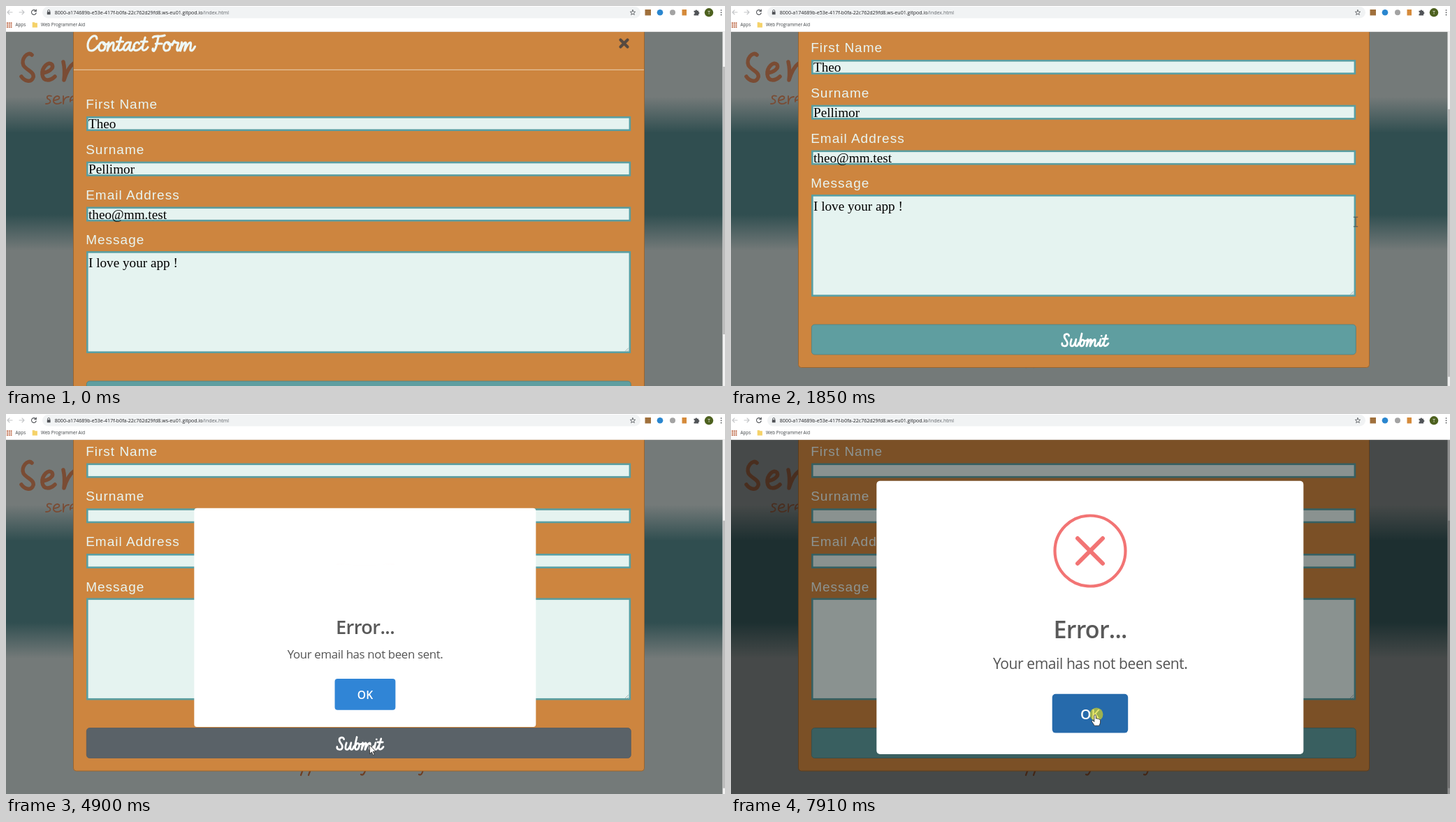
These frames come from a looping animation (1029 px wide and 544 px high, 7.99 s). An HTML page:

```html
<!DOCTYPE html>
<html lang="en">
<head>
<meta charset="utf-8">
<title>Contact form</title>
<style>
  html, body { margin: 0; width: 100%; height: 100%; overflow: hidden; background: #fff; }
  svg { display: block; width: 100%; height: 100%; }
  .ui { font-family: "Open Sans", "Noto Sans", sans-serif; }
  .label { font: 19px "Liberation Sans", Arial, sans-serif; letter-spacing: 1px; fill: #e8f5f2; }
  .value { font: 19.2px "Liberation Serif", "Times New Roman", serif; fill: #000; }
  .field { fill: #e5f3f0; stroke: #5a9ea1; stroke-width: 2.6; }
  .line { fill: none; stroke-linecap: round; stroke-linejoin: round; }
</style>
</head>
<body>
<svg viewBox="0 0 1029 544" preserveAspectRatio="none">
  <defs>
    <linearGradient id="band" gradientUnits="userSpaceOnUse" x1="0" y1="130" x2="0" y2="350">
      <stop offset="0" stop-color="#747a79"/>
      <stop offset=".235" stop-color="#304e50"/>
      <stop offset=".765" stop-color="#304e50"/>
      <stop offset="1" stop-color="#747a79"/>
    </linearGradient>
  </defs>

  <!-- page behind the form -->
  <rect y="37" width="1029" height="507" fill="url(#band)"/>
  <g class="line" stroke="#7a4c34">
    <path stroke-width="5.5" d="M37 70C31 64 21 76 25 85C29 92 41 94 39 102C36 111 26 107 22 101M52 96C60 95 69 90 66 84C61 78 51 88 52 98C53 108 63 108 70 101M82 80C84 88 84 97 83 106C86 96 90 87 97 82"/>
    <path stroke-width="1.8" d="M65 129C60 127 57 130 60 133C65 135 65 140 57 140M68 135C73 135 78 133 76 130C72 127 67 132 68 137C70 141 75 141 79 138M82 129L82 140C82 134 85 130 90 130M92 135C96 135 99 133 98 130C94 127 91 133 92 137"/>
  </g>
  <path class="line" stroke="#6d3f24" stroke-width="2.2" d="M426 506L422 517M437 506L433 517M515 506C514 514 511 518 508 516M597 506C597 514 594 518 591 516"/>

  <!-- form -->
  <g id="form">
    <rect x="96.5" y="0" width="817" height="598.5" rx="4" fill="#cd853f" stroke="#9a652f"/>
    <path d="M97 91.3H913" stroke="#e9d2b5"/>
    <g id="heading" class="line" stroke="#eef7f5" stroke-width="3.1" transform="translate(116 64)"></g>
    <path d="M879.5 48.5l10 10m0-10l-10 10" stroke="#574a40" stroke-width="4.2" stroke-linecap="round"/>
    <g id="fields"></g>
    <path d="M886 494.5l5-5m-2 5l2-2" stroke="#8a9a98" stroke-width=".7"/>
    <rect id="submit" x="115.3" y="537" width="779" height="43" rx="4.5" stroke="#4f7f81" stroke-width=".8"/>
    <g id="submitText" class="line" stroke="#fff" stroke-width="3.3" transform="translate(473 568) scale(.82)"></g>
  </g>
  <rect x="1025.5" y="37" width="4" height="507" fill="#f1f1f1"/>
  <rect id="thumb" x="1026" width="3" height="383" fill="#bdbdbd"/>
  <rect id="dim" y="37" width="1029" height="507"/>

  <!-- alert -->
  <g id="alert" class="ui">
    <rect x="208.3" y="95.8" width="611" height="391.2" rx="5" fill="#fff"/>
    <g class="line" stroke="#f27474">
      <circle id="ring" r="50.5" stroke-width="4.2"/>
      <path id="cross" d="M-18-18L18 18M18-18L-18 18" stroke-width="6"/>
    </g>
    <text x="461.5" y="321" font-size="34" font-weight="600" letter-spacing="-.75" fill="#595959">Error...</text>
    <text x="375" y="365" font-size="21" letter-spacing="-.41" fill="#545454">Your email has not been sent.</text>
    <rect id="ok" x="459.7" y="400.8" width="108.5" height="55.8" rx="5"/>
    <text x="514" y="436.5" font-size="19.5" font-weight="600" text-anchor="middle" fill="#fff">OK</text>
  </g>

  <!-- browser bars -->
  <g class="ui">
    <rect width="1029" height="37" fill="#fff"/>
    <rect x="52" y="1" width="856" height="16.5" rx="8.2" fill="#f1f3f4"/>
    <path d="M0 36.7H1029" stroke="#dcdcdc" stroke-width=".6"/>
    <g class="line" stroke-width="1.1">
      <path stroke="#c4c6c8" d="M9 9H2M5 6L2 9l3 3M19 9h7M23 6l3 3-3 3"/>
      <path stroke="#505357" d="M42.8 7.2A3.4 3.4 0 1 0 43.2 10M43.3 5v2.7h-2.7"/>
      <path stroke="#505357" stroke-width=".9" d="M59.7 8.5V7a1.5 1.5 0 0 1 3 0v1.5"/>
      <path stroke="#505357" stroke-width=".8" d="M897 5.6l1 2.5 2.7.2-2.1 1.7.7 2.6-2.3-1.4-2.3 1.4.7-2.6-2.1-1.7 2.7-.2z"/>
    </g>
    <rect x="58.8" y="8.3" width="4.8" height="4" rx=".5" fill="#505357"/>
    <text x="69.8" y="12" font-size="7.06" fill="#202124">8000-a174689b-e53e-417f-b0fa-22c762d29fd8.ws-eu01.gitpod.io<tspan fill="#5f6368">/index.html</tspan></text>
    <rect x="914.5" y="5" width="8.5" height="8.5" fill="#a0703c"/>
    <circle cx="936" cy="9.3" r="4.3" fill="#2a86cf"/>
    <circle cx="954" cy="9.3" r="4" fill="#a3a3a3"/>
    <rect x="967.5" y="5" width="6.5" height="8.5" fill="#d58a3a"/>
    <path d="M984.5 6.8h2a1.3 1.3 0 1 1 2.6 0h2v2a1.3 1.3 0 1 1 0 2.6v2h-6.6v-2a1.3 1.3 0 0 0 0-2.6z" fill="#505357"/>
    <circle cx="1006" cy="9.3" r="6.2" fill="#4d611f"/>
    <text x="1006" y="11.8" font-size="6.5" text-anchor="middle" fill="#fff">T</text>
    <path class="line" d="M1023.5 6h.1M1023.5 9.3h.1M1023.5 12.6h.1" stroke="#505357" stroke-width="1.7"/>
    <path d="M1 24.5h8M1 27.3h8M1 30.1h8" stroke="#b4552f" stroke-width="1.8" stroke-dasharray="1.8 1"/>
    <path d="M37.7 23.3h3l1 1h3.2v6.4h-7.2z" fill="#f5d269"/>
    <g font-size="6.3" fill="#3c4043">
      <text x="13.5" y="29.2">Apps</text>
      <text x="50" y="29.2">Web Programmer Aid</text>
    </g>
  </g>

  <!-- pointer -->
  <circle id="click" r="9.5" fill="#dcd71e" opacity=".65"/>
  <g id="pointer">
    <path id="arrow" d="M0 0V12.6L2.9 9.9 4.9 14.4 6.8 13.6 4.8 9.2H8.7z" fill="#fff" stroke="#222" stroke-width=".8"/>
    <path id="beam" d="M-3.2-6.8H3.2M0-6.8V6.8M-3.2 6.8H3.2" fill="none" stroke="#4a5554"/>
    <path id="hand" d="M-1.2 8V1C-1.2-.9 1.3-.9 1.3 1V5.3C2.2 4.3 3.6 4.7 3.8 5.7 4.8 4.9 6 5.4 6 6.4 7 5.9 7.8 6.6 7.6 7.6V11L6 15.2H-.8L-4.4 9.6C-5.2 8-3.8 7-2.6 8.2L-1.2 9.6z" fill="#fff" stroke="#222" stroke-width=".8"/>
  </g>
</svg>

<script>
const LOOP = 7990;
const $ = id => document.getElementById(id);
const set = (id, attrs) => { for (const k in attrs) $(id).setAttribute(k, attrs[k]); };
const show = (id, on) => { $(id).style.display = on ? '' : 'none'; };
const clamp = v => Math.min(1, Math.max(0, v));
const mix = (a, b, p) => a + (b - a) * p;

// Brush script letters: advance width, then strokes on a baseline at 0
const brush = {
  C: [15.4, 'M14-17C14-22 9-23 5-18C-1-11 0 0 6 0C10 0 13-3 16-7'],
  o: [12.6, 'M8-12C1-14-1 0 5 0C12 0 12-11 8-12C7-8 11-8 14-10'],
  n: [14.6, 'M3-12L1 0C3-8 9-14 10-11C11-8 7 0 11 0C13 0 15-4 16-6'],
  t: [9, 'M6-19L2-5C1 1 6 1 10-5M0-13H9'],
  a: [14, 'M10-11C5-15 0-6 1-2C3 3 9-5 11-12C9-5 8 0 11 0C13 0 15-4 16-6'],
  c: [11.6, 'M9-10C8-14 1-12 1-4C1 1 7 1 12-5'],
  ' ': [7, ''],
  F: [15, 'M1-19C5-23 11-19 18-22M9-20C7-12 6-3 3 0C1 1 0-1 1-3M5-10H14'],
  r: [11.7, 'M1-8L4-14C5-10 9-12 10-11C8-6 7 0 9 0C11 0 12-3 13-5'],
  m: [21.5, 'M3-12L1 0C3-8 8-14 9-11C9-8 7-3 7 0C10-8 15-14 16-11C17-8 13 0 17 0C19 0 21-4 22-6'],
  S: [14.5, 'M13-18C13-23 4-22 5-16C6-11 12-9 10-3C8 2 0 0 1-5'],
  u: [15, 'M3-12C0-3 1 0 4 0C7 0 10-7 11-12C9-4 9 0 12 0C14 0 15-4 16-6'],
  b: [13.3, 'M6-22C4-12 0-2 5 0C10 0 12-10 8-11C6-12 4-8 3-6M10-9L14-10'],
  i: [7.5, 'M4-12C2-5 1 0 4 0C6 0 8-4 9-6M5.5-18h.1'],
};
function letter(id, text) {
  let x = 0;
  $(id).setAttribute('aria-label', text);
  for (const ch of text) {
    const [advance, d] = brush[ch];
    $(id).innerHTML += `<path d="${d}" transform="translate(${x} 0)"/>`;
    x += advance;
  }
}
letter('heading', 'Contact Form');
letter('submitText', 'Submit');

const fields = [
  ['First Name', 'Theo', 158, 21],
  ['Surname', 'Pellimor', 222.7, 21],
  ['Email Address', 'theo@mm.test', 287.5, 21],
  ['Message', 'I love your app !', 351, 146],
];
$('fields').innerHTML = fields.map(([name, value, y, h]) => `
  <text class="label" x="114.2" y="${h > 21 ? y - 10 : y - 11}">${name}</text>
  <rect class="field" x="116.3" y="${y + 1.3}" width="776.6" height="${h - 2.6}"/>
  <text class="value" x="118" y="${h > 21 ? y + 23 : y + 17}">${value}</text>`).join('');
const values = document.querySelectorAll('.value');

// Progress 0..1 in n held steps, the first at start, the last at end
const steps = (t, start, end, n) =>
  t < start ? 0 : Math.min(n, 1 + Math.floor((t - start) / (end - start) * (n - 1) + 1e-6)) / n;

// start, end, steps, destination
const moves = [
  [70, 530, 8, 879, 302],
  [750, 1060, 5, 894, 306],
  [1540, 1850, 5, 894, 309],
  [2090, 2850, 11, 547, 469],
  [2930, 3170, 4, 521, 476],
  [4800, 4801, 1, 520.5, 474],
  [6280, 6670, 6, 521, 431],
];
function pointerAt(t) {
  let x = 970, y = 452;
  for (const [start, end, n, toX, toY] of moves) {
    const p = steps(t, start, end, n);
    x = mix(x, toX, p);
    y = mix(y, toY, p);
  }
  return [x, y];
}

const scrollStops = [[1540, 10], [1630, 31.5], [1700, 55], [1770, 71], [1850, 81], [1940, 87.5]];
const scrollAt = t => scrollStops.reduce((s, [at, to]) => t >= at ? to : s, 0);

// Values at stops [position, value, ...], eased between neighbours
function keyed(p, stops) {
  for (let i = 0; i < stops.length - 2; i += 2) {
    if (p <= stops[i + 2]) {
      const u = clamp((p - stops[i]) / (stops[i + 2] - stops[i]));
      return mix(stops[i + 1], stops[i + 3], u * (2 - u));
    }
  }
  return stops[stops.length - 1];
}

function drawAlert(t) {
  const open = t >= 4900;
  show('alert', open);
  const held = 4900 + Math.floor((t - 4900) / 64.28) * 64.28;
  set('dim', { opacity: open ? 0.4 * clamp((held - 4900) / 100) : 0 });
  if (!open) return;
  const scale = keyed((held - 4879) / 300, [0, 0.7, 0.45, 1.05, 0.8, 0.95, 1, 1]);
  const p = clamp((held - 4880) / 465);
  const turn = Math.cos((1 - p) * (1 - p) * 100 * Math.PI / 180);
  const drop = keyed(p, [0, 24, 0.5, 24, 0.8, -5, 1, 0]);
  const size = keyed(p, [0, 0.4, 0.5, 0.4, 0.8, 1.15, 1, 1]);
  set('alert', { transform: `translate(514 291.4) scale(${scale}) translate(-514 -291.4)` });
  set('ring', { transform: `translate(514 196) scale(1 ${turn})`, opacity: p });
  set('cross', { transform: `translate(514 ${196 + drop}) scale(${size})`, opacity: clamp((p - 0.5) / 0.3) });
}

function draw(t) {
  const scroll = scrollAt(t);
  const [x, y] = pointerAt(t);
  const within = (left, right, top, bottom) => x >= left && x <= right && y >= top && y <= bottom;

  set('form', { transform: `translate(0 ${-scroll})` });
  set('thumb', { y: 87 + 0.75 * scroll });
  values.forEach(v => { v.style.display = t < 3720 ? '' : 'none'; });

  const overSubmit = within(115, 895, 537 - scroll, 580 - scroll);
  set('submit', { fill: overSubmit && t < 4964 ? '#5a6268' : '#5f9ea0',
                  stroke: overSubmit && t < 4964 ? '#545b62' : '#4f7f81' });
  drawAlert(t);

  const overOk = t > 4964 && within(460, 568, 401, 457);
  set('ok', { fill: t >= 7910 ? '#266aab' : overOk ? '#2b78c1' : '#3085d6' });

  const overField = t < 4800 && fields.some(f => within(115, 895, f[2] - scroll, f[2] + f[3] - scroll));
  const overButton = overOk || (overSubmit && t < 4800);
  show('pointer', t >= 70);
  set('pointer', { transform: `translate(${x} ${y})` });
  show('beam', overField);
  show('hand', overButton);
  show('arrow', !overField && !overButton);

  show('click', (t >= 3630 && t < 3810) || t >= 7910);
  set('click', { cx: x + 2, cy: y - 1 });
}

const began = performance.now();
function tick() {
  draw((performance.now() - began) % LOOP);
  requestAnimationFrame(tick);
}
tick();
</script>
</body>
</html>
```
